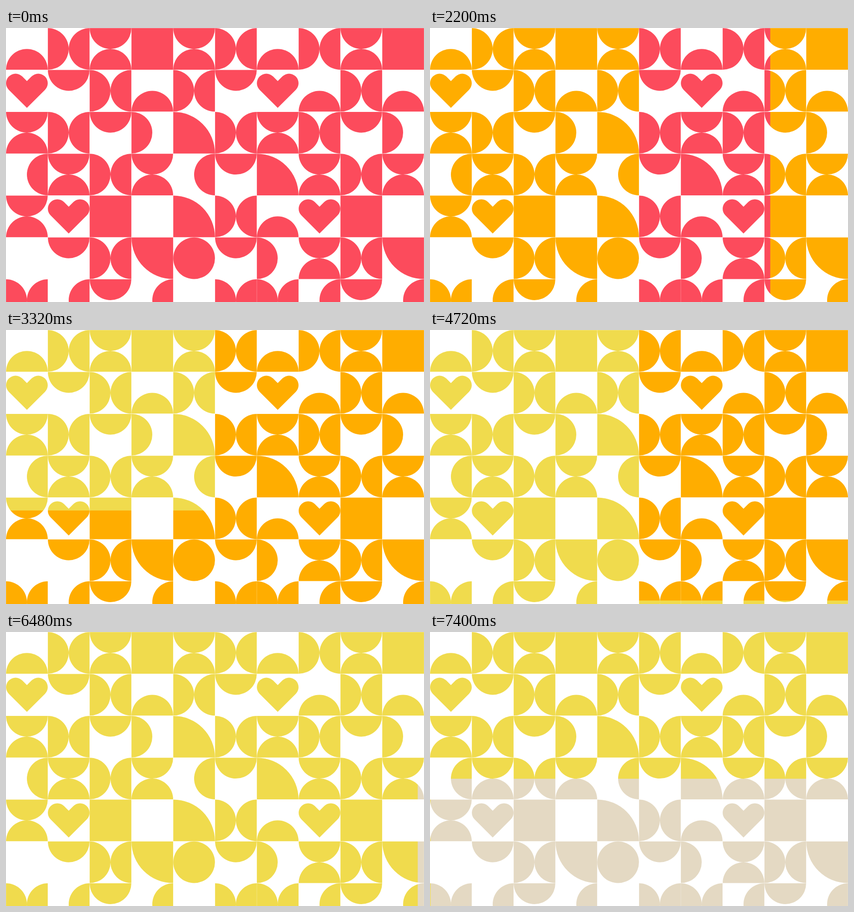
Write an HTML page with a canvas that moves like this. It is 900 px wide and 591 px high and loops after 8000 ms.

```html
<!DOCTYPE html>
<html>
<head>
<meta charset="utf-8">
<style>
html, body { margin: 0; overflow: hidden; background: #fff; }
canvas { display: block; }
</style>
</head>
<body>
<canvas width="900" height="591"></canvas>
<script>
const W = 900, H = 591, LOOP = 8000, STEP = 40;
const PINK = '#fc4b5c', ORANGE = '#ffad00', YELLOW = '#f0db4d', BEIGE = '#e4d9c3';
const ctx = document.querySelector('canvas').getContext('2d');

// L R T B: half discs by flat side, H: L+R, V: T+B, S: square,
// Q q: quarter discs, O: disc, h: heart
const ROWS = [
  'BHVSVHBHVS',
  'hTHBHThBHB',
  'VHTLQHVHTL',
  'RVHVRTQVHV',
  'VhS.QHBhS.',
  '.THqOTLVHq',
  'HRTR.HHRTR'
];

const tiles = new Path2D();

function disc(x, y, r, from, to) {
  const p = new Path2D();
  p.arc(x, y, r, from * Math.PI, to * Math.PI);
  if (r > 45) p.lineTo(x, y);
  p.closePath();
  return p;
}

function heart() {
  const p = new Path2D(), r = 20.5, y = 28.5, q = Math.PI / 4;
  p.arc(r, y, r, 3 * q, 7 * q);
  p.lineTo(45, 24);
  p.arc(90 - r, y, r, 5 * q, 9 * q);
  p.lineTo(45, 82);
  p.closePath();
  return p;
}

const square = new Path2D();
square.rect(0, 0, 90, 90);

const SHAPES = {
  L: [disc(0, 45, 45, -.5, .5)],
  R: [disc(90, 45, 45, .5, 1.5)],
  T: [disc(45, 0, 45, 0, 1)],
  B: [disc(45, 90, 45, 1, 2)],
  S: [square],
  Q: [disc(0, 90, 90, -.5, 0)],
  q: [disc(90, 0, 90, .5, 1)],
  O: [disc(45, 45, 45, 0, 2)],
  h: [heart()],
  '.': []
};
SHAPES.H = [...SHAPES.L, ...SHAPES.R];
SHAPES.V = [...SHAPES.T, ...SHAPES.B];

ROWS.forEach((row, r) => [...row].forEach((kind, c) => {
  const m = new DOMMatrix([.997, 0, 0, .997, 90 * c + .15, 90.3 * r + .3]);
  SHAPES[kind].forEach(s => tiles.addPath(s, m));
}));

function bezier(x1, y1, x2, y2) {
  const at = (a, b, s) => 3 * a * s * (1 - s) ** 2 + 3 * b * s * s * (1 - s) + s ** 3;
  return p => {
    if (p <= 0 || p >= 1) return p <= 0 ? 0 : 1;
    let lo = 0, hi = 1;
    for (let i = 0; i < 30; i++) {
      const mid = (lo + hi) / 2;
      if (at(x1, x2, mid) < p) lo = mid; else hi = mid;
    }
    return at(y1, y2, lo);
  };
}

const smooth = bezier(.35, .1, .4, 1);
const WIPES = [
  { start: 983, time: 800, ease: bezier(.2, .2, 0, 1), color: ORANGE,
    box: e => [0, 0, 450 * e, H] },
  { start: 2056, time: 800, ease: bezier(.2, .2, .2, 1), color: ORANGE,
    box: e => [W - 450 * e, 0, 450 * e, H] },
  { start: 3013, time: 800, ease: bezier(.25, .1, .25, 1), color: YELLOW,
    box: e => [0, 0, 450, H * e] },
  { start: 4686, time: 1000, ease: smooth, color: YELLOW,
    box: e => [450, H * (1 - e), 450, H * e] },
  { start: 6441, time: 1000, ease: smooth, color: BEIGE,
    box: e => [W * (1 - e), 316.5, W * e, H] }
];

function draw(t) {
  ctx.globalCompositeOperation = 'source-over';
  ctx.clearRect(0, 0, W, H);
  ctx.fillStyle = PINK;
  ctx.fill(tiles);
  ctx.globalCompositeOperation = 'source-atop';
  for (const w of WIPES) {
    const e = w.ease((t - w.start) / w.time);
    if (!e) continue;
    ctx.fillStyle = w.color;
    ctx.fillRect(...w.box(e));
  }
  ctx.globalCompositeOperation = 'destination-over';
  ctx.fillStyle = '#fff';
  ctx.fillRect(0, 0, W, H);
}

const begin = performance.now();
function frame() {
  const t = (performance.now() - begin) % LOOP;
  draw(Math.floor(t / STEP) * STEP);
  requestAnimationFrame(frame);
}
frame();
</script>
</body>
</html>
```
